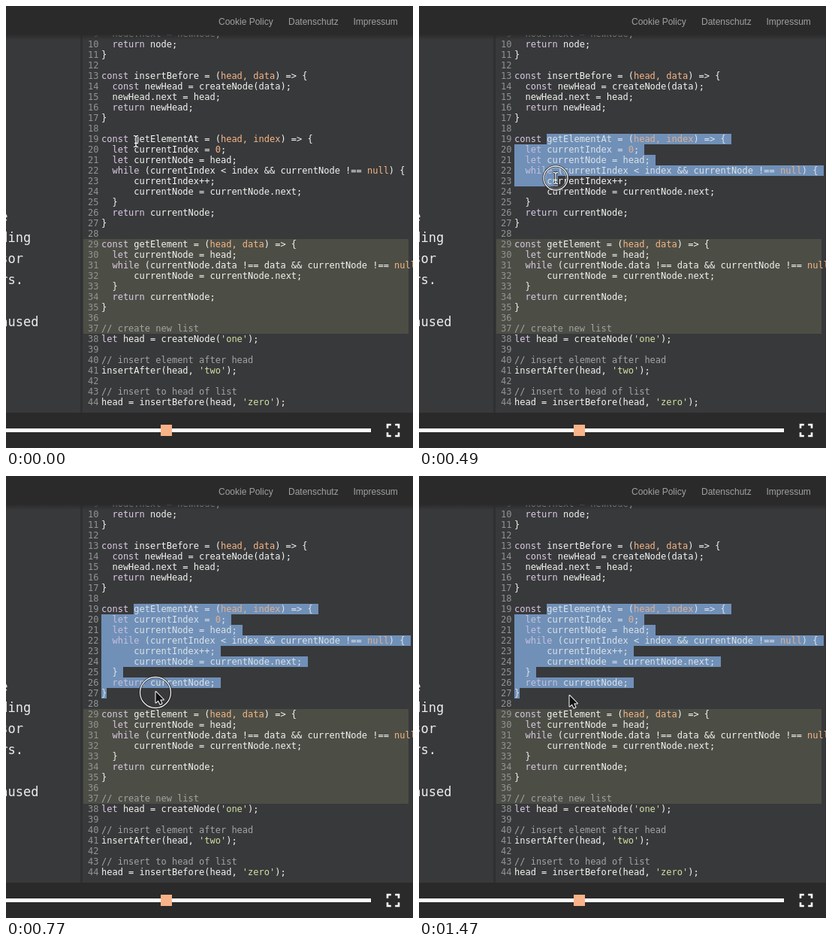
An HTML page with a canvas for the animation above (1540 ms loop, 542 by 588 pixels).

```html
<!DOCTYPE html>
<html lang="en">
<head>
<meta charset="utf-8">
<title>Code player</title>
<style>
html, body { margin: 0; width: 100%; height: 100%; overflow: hidden; background: #2a2a2a; }
canvas { display: block; }
</style>
</head>
<body>
<canvas id="stage" width="542" height="588"></canvas>
<script>
const ctx = document.getElementById('stage').getContext('2d');
const LOOP = 1540, STEP = 70;
const MONO = '"DejaVu Sans Mono", monospace';
const SANS = '"Liberation Sans", Arial, sans-serif';
const FIRST = 9, LINE = 14, TOP = 30, LEFT = 127, CHAR = 7.224;
const ANCHOR = { line: 19, col: 6 };
const SELECTION = '#7090b8';

const code = `  node.next = newNode;
  return node;
}

const insertBefore = (head, data) => {
  const newHead = createNode(data);
  newHead.next = head;
  return newHead;
}

const getElementAt = (head, index) => {
  let currentIndex = 0;
  let currentNode = head;
  while (currentIndex < index && currentNode !== null) {
      currentIndex++;
      currentNode = currentNode.next;
  }
  return currentNode;
}

const getElement = (head, data) => {
  let currentNode = head;
  while (currentNode.data !== data && currentNode !== null) {
      currentNode = currentNode.next;
  }
  return currentNode;
}

// create new list
let head = createNode('one');

// insert element after head
insertAfter(head, 'two');

// insert to head of list
head = insertBefore(head, 'zero');`.split('\n');

const TOKEN = /(?<comment>\/\/.*)|(?<string>'[^']*')|(?<keyword>\b(?:const|let|return|while)\b)|(?<value>\b(?:null|\d+)\b|(?<=\()[^()]+(?=\) =>))/g;
const COLORS = { plain: '#f4f4f0', comment: '#a3a4a2', string: '#d3e1a0', keyword: '#dccbe4', value: '#f7b685' };

// Pointer keyframes: time, x, y, ring radius
const path = [
  [0, 173, 180, 17], [350, 172, 182, 17], [420, 175, 203, 17], [490, 182, 229, 17],
  [560, 187, 248, 19], [630, 191, 265, 22], [700, 196, 279, 22], [770, 199, 288, 21.5],
  [840, 200, 292, 21.5], [1190, 200, 293, 21.5], [1540, 200, 293, 21.5]
];

function pointerAt(t) {
  const i = path.findIndex(k => k[0] > t);
  const a = path[i - 1], b = path[i];
  const f = (t - a[0]) / (b[0] - a[0]);
  const [x, y, r] = [1, 2, 3].map(n => a[n] + (b[n] - a[n]) * f);
  return { x, y, r };
}

function rect(x, y, w, h, color) {
  ctx.fillStyle = color;
  ctx.fillRect(x, y, w, h);
}

function text(str, x, y, color, font) {
  ctx.font = font;
  ctx.fillStyle = color;
  ctx.fillText(str, x, y);
}

const lineTop = n => TOP + (n - FIRST) * LINE;

function tokens(line) {
  const parts = [];
  let pos = 0;
  for (const m of line.matchAll(TOKEN)) {
    parts.push([pos, line.slice(pos, m.index), 'plain']);
    parts.push([m.index, m[0], Object.keys(m.groups).find(k => m.groups[k])]);
    pos = m.index + m[0].length;
  }
  parts.push([pos, line.slice(pos), 'plain']);
  return parts;
}

const tokenLines = code.map(tokens);

function selectionRects(p) {
  const last = Math.floor((p.y - 3 - TOP) / LINE) + FIRST;
  const rects = [];
  for (let n = ANCHOR.line; n <= last; n++) {
    const length = code[n - FIRST].length;
    const from = n === ANCHOR.line ? ANCHOR.col : 0;
    const to = n === last ? Math.min(length, Math.round((p.x - LEFT) / CHAR)) : length + 1;
    if (to > from) rects.push([Math.round(LEFT + from * CHAR), lineTop(n), Math.round((to - from) * CHAR), LINE]);
  }
  return rects;
}

function drawEditor(selected) {
  rect(0, 38, 542, 503, '#38393b');
  rect(99, 38, 3, 503, '#2f3032');
  rect(541, 38, 1, 503, '#303133');
  rect(103, lineTop(29), 433, 9 * LINE, '#4c4e46');
  selected.forEach(r => rect(...r, SELECTION));

  const font = '12px ' + MONO;
  tokenLines.forEach((parts, i) => {
    const y = TOP + i * LINE + 25 - LINE - 1 + 1;
    const n = i + FIRST;
    text(String(n).padStart(2), 109, y + 14 - LINE, '#929391', font);
    for (const [col, str, kind] of parts) text(str, LEFT + col * CHAR, y, COLORS[kind], font);
  });

  ctx.globalAlpha = 0.18;
  selected.forEach(r => rect(...r, SELECTION));
  ctx.globalAlpha = 1;

  const notes = [['e', 286], ['ding', 314], ['sor', 342], ['rs.', 370], ['aused', 426]];
  for (const [str, y] of notes) text(str, -7.8, y, '#ececec', '17px ' + MONO);
}

function drawBars() {
  rect(0, 0, 542, 38, '#2a2a2a');
  const shade = ctx.createLinearGradient(0, 38, 0, 45);
  shade.addColorStop(0, 'rgba(42,42,42,.95)');
  shade.addColorStop(1, 'rgba(42,42,42,0)');
  rect(0, 38, 542, 7, shade);
  const links = [['Cookie Policy', 283], ['Datenschutz', 376], ['Impressum', 462.5]];
  for (const [str, x] of links) text(str, x, 25, '#a0a0a0', '12px ' + SANS);

  rect(0, 541, 542, 47, '#2a2a2a');
  rect(0, 562, 486, 5, '#ffffff');
  rect(206, 557, 15, 15, '#f9b388');

  ctx.strokeStyle = '#ffffff';
  ctx.lineWidth = 2.6;
  for (const sx of [-1, 1]) for (const sy of [-1, 1]) {
    ctx.beginPath();
    ctx.moveTo(515.5 + sx * 2.7, 564.5 + sy * 7.5);
    ctx.lineTo(515.5 + sx * 7.5, 564.5 + sy * 7.5);
    ctx.lineTo(515.5 + sx * 7.5, 564.5 + sy * 2.7);
    ctx.stroke();
  }
}

function outline(shape, inner, outer, width) {
  ctx.strokeStyle = outer;
  ctx.lineWidth = width + 1.8;
  ctx.stroke(shape);
  ctx.strokeStyle = inner;
  ctx.lineWidth = width;
  ctx.stroke(shape);
}

function drawRing({ x, y, r }) {
  const ring = new Path2D();
  ring.arc(x, y, r - 1, 0, Math.PI * 2);
  outline(ring, '#f2f2f2', 'rgba(20,20,20,.75)', 1.3);
  if (r < 20) {
    ctx.beginPath();
    ctx.arc(x, y, r - 3, 0, Math.PI * 2);
    ctx.strokeStyle = 'rgba(225,225,225,.55)';
    ctx.lineWidth = 0.8;
    ctx.stroke();
  }
}

function drawPointer(p, arrow) {
  ctx.save();
  ctx.translate(p.x, p.y);
  if (arrow) {
    const shape = new Path2D('M.5-1V13.5L3.8 10.4L6.2 15.6L8.5 14.6L6.2 9.6H10.8Z');
    ctx.lineJoin = 'round';
    ctx.strokeStyle = '#ffffff';
    ctx.lineWidth = 2;
    ctx.stroke(shape);
    ctx.fillStyle = '#111111';
    ctx.fill(shape);
  } else {
    const beam = new Path2D('M-3-7.5Q0-7.5 0-5.5Q0-7.5 3-7.5M0-5.5V5.5M-3 7.5Q0 7.5 0 5.5Q0 7.5 3 7.5M-2 2.5H2');
    outline(beam, '#ffffff', '#1c1c1c', 1.3);
  }
  ctx.restore();
}

function draw(now) {
  const t = Math.floor((now % LOOP) / STEP) * STEP;
  const p = pointerAt(t);
  drawEditor(selectionRects(p));
  drawBars();
  if (t >= 280 && t < 1330) drawRing(p);
  drawPointer(p, t >= 630);
}

function frame() {
  draw(performance.now());
  requestAnimationFrame(frame);
}
frame();
</script>
</body>
</html>
```
